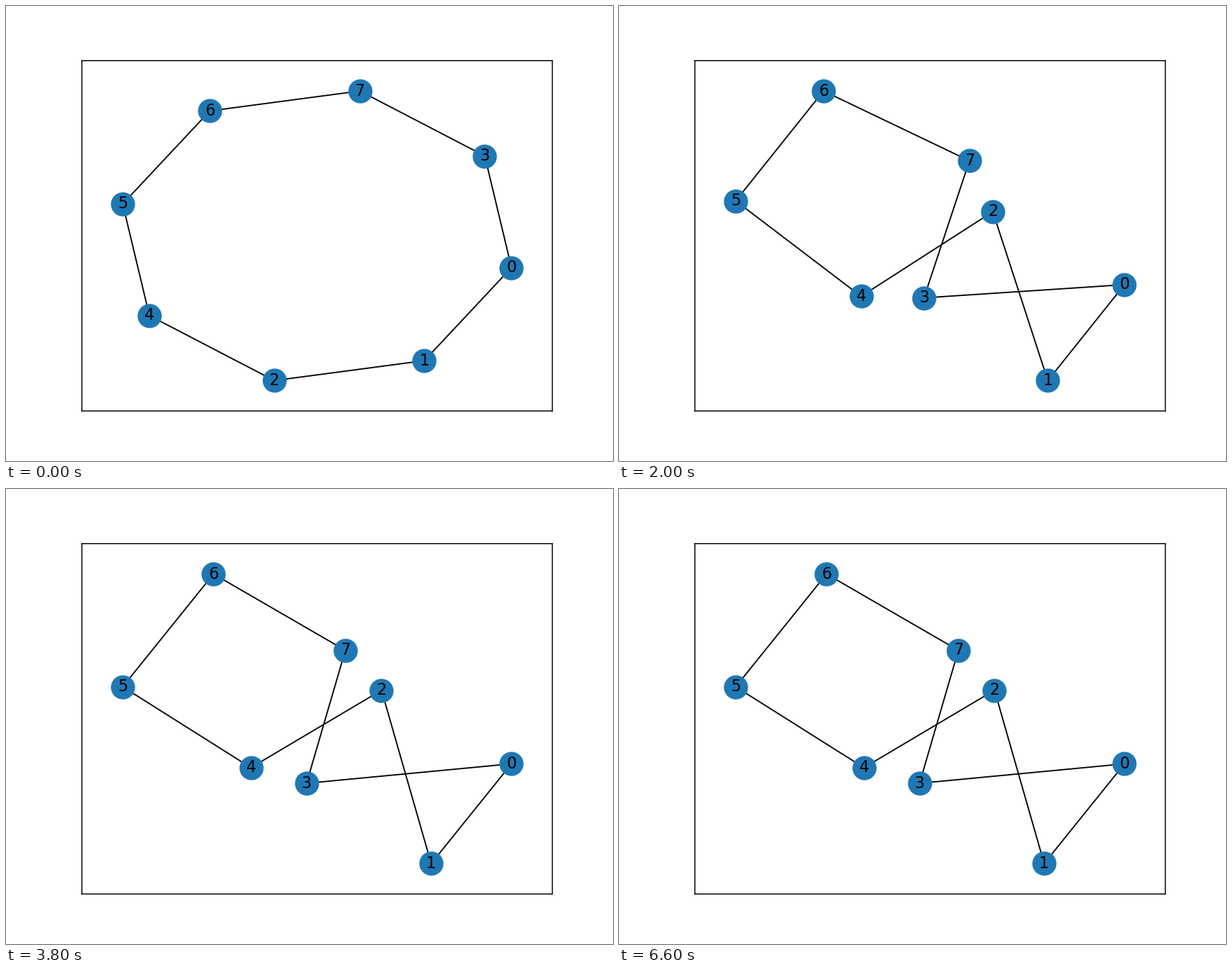
Write a matplotlib script that moves like this. It is 864 px wide and 648 px high and loops after 7.4 s.

```python
import numpy as np
import matplotlib.pyplot as plt
from matplotlib.animation import FuncAnimation
from matplotlib.collections import LineCollection

STEP_MS, STEPS = 200, 37
RING = [0, 3, 7, 6, 5, 4, 2, 1]
EDGES = list(zip(RING, RING[1:] + RING[:1]))
HALF = len(RING) // 2
TILT = np.exp(-1j * np.radians(34.9))  # direction of the mirror axis
PAD = 0.105  # view margin on each side, as a share of the layout's extent

# The ring is symmetric about its axis, so only one half is described:
# real part along the axis, imaginary part away from it.
octagon = np.exp(1j * np.pi / 8 * (2 * np.arange(HALF) + 1))
twisted = [1.132 + .42j, .203 - .392j, -.132 + .494j, -1.081 + .475j]
KEYS = {
    1: octagon,
    6: [1.087 + .476j, -.416 - .223j, -.335 + .515j, -1.163 + .396j],
    10: [1.155 + .404j, .215 - .363j, -.102 + .571j, -1.1 + .463j],
    16: [1.149 + .403j, .192 - .395j, -.154 + .43j, -1.064 + .495j],
    19: twisted,
}
TRACKS = np.transpose(list(KEYS.values()))


def layout(step):
    """Positions of nodes 0 to 7 at a step."""
    half = np.array([np.interp(step, list(KEYS), track) for track in TRACKS])
    ring = TILT * np.concatenate([half, half.conj()[::-1]])
    pos = np.empty((len(RING), 2))
    pos[RING] = np.column_stack([ring.real, ring.imag])
    return pos


fig, ax = plt.subplots(figsize=(6.4, 4.8), dpi=135)
fig.subplots_adjust(left=0.125, right=0.9, bottom=0.11, top=0.88)
ax.set(xticks=[], yticks=[])
for spine in ax.spines.values():
    spine.set_snap(False)

start = layout(0)
lines = LineCollection([], colors="black", linewidths=1, zorder=1)
ax.add_collection(lines)
nodes = ax.scatter(*start.T, s=300, c="#1f78b4", linewidths=1, zorder=2)
labels = [ax.text(x, y, str(n), size=12, family="DejaVu Sans", color="black",
                  ha="center", va="center", zorder=3)
          for n, (x, y) in enumerate(start)]


def draw(step):
    pos = layout(step)
    lines.set_segments([pos[list(edge)] for edge in EDGES])
    nodes.set_offsets(pos)
    for label, point in zip(labels, pos):
        label.set_position(point)
    low, high = pos.min(axis=0), pos.max(axis=0)
    margin = PAD * (high - low)
    ax.set_xlim(low[0] - margin[0], high[0] + margin[0])
    ax.set_ylim(low[1] - margin[1], high[1] + margin[1])
    return [lines, nodes, *labels]


anim = FuncAnimation(fig, draw, frames=STEPS, interval=STEP_MS,
                     init_func=lambda: draw(0), repeat=True, repeat_delay=0)
plt.show()
```
